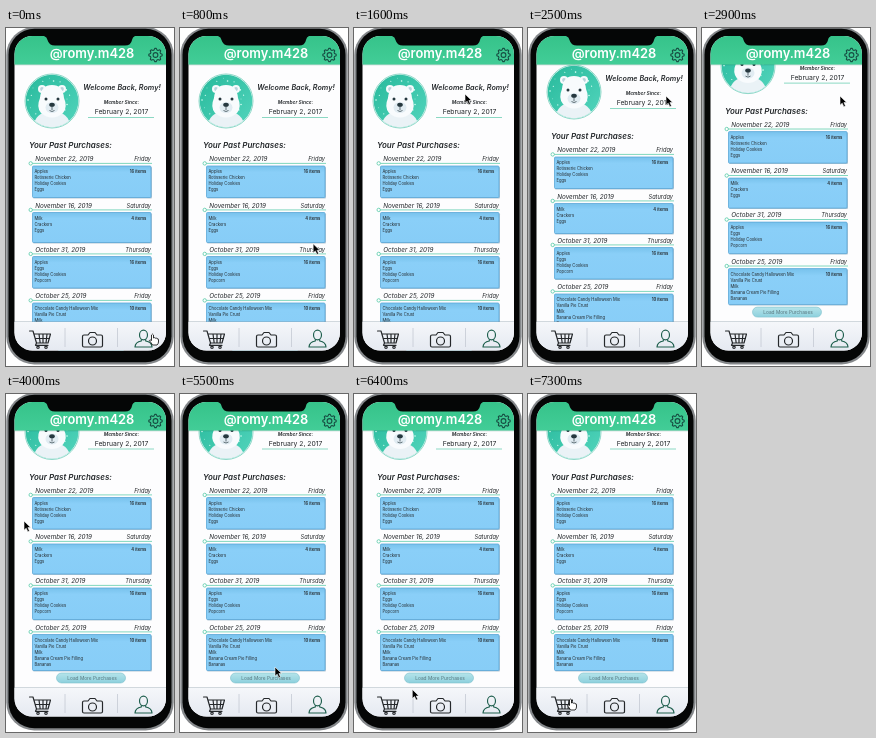
Animation of 168x338 px, one loop 7400 ms. Source, as an HTML page:

```html
<!DOCTYPE html>
<html lang="en">
<head>
<meta charset="utf-8">
<title>Past purchases</title>
<style>
  html, body { margin: 0; width: 100%; height: 100%; overflow: hidden; background: #fff; }
  svg { display: block; width: 100vw; height: 100vh; font-family: Inter, sans-serif; fill: #23272a; }
  .b { font-weight: 600; }
  .i { font-style: italic; }
  .line { fill: none; stroke: #25282b; stroke-width: 1.2; stroke-linecap: round; stroke-linejoin: round; }
</style>
</head>
<body>
<svg viewBox="0 0 168 338">
  <defs>
    <clipPath id="screen"><rect x="8.500" y="8" width="151.500" height="314.500" rx="18"/></clipPath>
    <clipPath id="round"><circle cx="46" cy="69" r="26.300"/></clipPath>
    <linearGradient id="green" x2="0" y2="1"><stop stop-color="#36c38a"/><stop offset="1" stop-color="#42cd97"/></linearGradient>
    <linearGradient id="teal" x2="1" y2="1"><stop stop-color="#27b99b"/><stop offset="1" stop-color="#53d5bd"/></linearGradient>
    <linearGradient id="blue" x2="0" y2="1"><stop stop-color="#78c2ec"/><stop offset=".2" stop-color="#8acff8"/><stop offset="1" stop-color="#87cdf7"/></linearGradient>
    <linearGradient id="pill" x2="0" y2="1"><stop stop-color="#b5e4ea"/><stop offset="1" stop-color="#8dd0dd"/></linearGradient>
    <linearGradient id="bar" x2="0" y2="1"><stop stop-color="#f5f7fa"/><stop offset="1" stop-color="#e5e9f1"/></linearGradient>
  </defs>

  <!-- phone body -->
  <rect x=".3" y="-1" width="167.400" height="337.500" rx="28" fill="#85888b"/>
  <rect x="2.500" y=".8" width="163" height="333.500" rx="26" fill="#050606"/>

  <g clip-path="url(#screen)">
    <rect x="8" y="8" width="153" height="315" fill="#fdfdfe"/>
    <g id="page">
      <g transform="translate(0 4)">
        <circle cx="46" cy="69" r="27" fill="#fff" stroke="#72cdb9" stroke-width=".8"/>
        <g clip-path="url(#round)">
          <rect x="19" y="42" width="54" height="54" fill="url(#teal)"/>
          <g id="snow" fill="#d9fff5"></g>
          <path d="M27 97Q28 80 46 79Q64 80 65 97Z" fill="#eaf2f6"/>
          <circle cx="36" cy="57" r="4" fill="#f6fafc"/><circle cx="56" cy="57" r="4" fill="#f6fafc"/>
          <circle cx="36" cy="57" r="1.900" fill="#bad3dc"/><circle cx="56" cy="57" r="1.900" fill="#bad3dc"/>
          <path d="M34 66Q35 53 46 53Q57 53 58 66Q62 75 57 81Q46 90 35 81Q30 75 34 66Z" fill="#f8fbfd"/>
          <ellipse cx="46" cy="75.500" rx="6.500" ry="5.500" fill="#e1ecf2"/>
          <circle cx="40" cy="67" r="1.500" fill="#26383f"/><circle cx="52" cy="67" r="1.500" fill="#26383f"/>
          <ellipse cx="46" cy="72.800" rx="2.800" ry="2" fill="#26383f"/>
          <path d="M46 74v4M43.500 78.500q2.500 2 5 0" fill="none" stroke="#26383f" stroke-width=".7"/>
        </g>
      </g>
      <g text-anchor="middle">
        <text class="b i" x="116" y="61.500" font-size="7.2">Welcome Back, Romy!</text>
        <text class="b i" x="115.500" y="76" font-size="4.9">Member Since:</text>
        <text x="115.500" y="86.300" font-size="6.8">February 2, 2017</text>
      </g>
      <path d="M82 89.500H148" stroke="#6fd0b4" stroke-width=".8"/>
      <text class="b i" x="23" y="120" font-size="8">Your Past Purchases:</text>
      <g id="cards"></g>
      <rect x="50.500" y="313.500" width="69" height="10" rx="5" fill="url(#pill)" stroke="#7fc0cc" stroke-width=".6"/>
      <text x="86" y="320.200" font-size="4.8" text-anchor="middle" fill="#58777f">Load More Purchases</text>
    </g>

    <!-- header -->
    <rect x="8" y="36" width="153" height="1.300" fill="#17664b" opacity=".25"/>
    <rect x="8" y="8" width="153" height="28.500" fill="url(#green)"/>
    <path d="M38 8H129Q126.500 9 126 12Q125 17.500 119 17.500H49Q43 17.500 41.500 12Q41 9 38 8Z" fill="#050606"/>
    <text class="b" x="86" y="29.700" font-size="12.9" text-anchor="middle" fill="#fff">@romy.m428</text>
    <g id="gear" transform="translate(149.500 27)" fill="none" stroke="#174f43" stroke-width="1.100"></g>

    <!-- tab bar -->
    <rect x="8" y="293" width="153" height="1.400" fill="#7e929e" opacity=".35"/>
    <rect x="8" y="294" width="153" height="29" fill="url(#bar)"/>
    <path d="M59 300V319M111.500 300V319" stroke="#c4cad4" stroke-width=".8"/>
    <g class="line">
      <path d="M23.500 303h3.500l3.500 12h11.500l2.500-9H28M29.500 310.500h14M33 306l1.200 9M37 306v9M41 306l-1 9M30.500 315l-1 2.300h12.500"/>
      <circle cx="32" cy="319.300" r="1.200"/><circle cx="40" cy="319.300" r="1.200"/>
      <path d="M78 307h4l2-2.500h5l2 2.500h4q1.500 0 1.500 1.500v9q0 1.500-1.500 1.500H78q-1.500 0-1.500-1.500v-9q0-1.500 1.500-1.500Z"/>
      <circle cx="86.500" cy="313" r="4"/>
      <g stroke="#20604f">
        <ellipse cx="137.500" cy="307" rx="4" ry="4.800"/>
        <path d="M135.300 311.500v1.500q-6 1-6.300 6h17q-.3-5-6.300-6v-1.500"/>
      </g>
    </g>
  </g>

  <g id="cursor">
    <path id="arrow" d="M0 0V9.200L2.200 7.200L3.800 10.700L5.500 9.900L3.900 6.600H6.700Z" fill="#000" stroke="#fff" stroke-width=".6"/>
    <path id="hand" d="M-1 1Q0-.8 1 1V4Q2 3.200 2.800 4.200Q3.800 3.500 4.500 4.700Q6 4.300 6 6V8Q5.800 10 4.500 11H0Q-1 9-3.200 6.600Q-2.800 5.200-1 6.500Z" fill="#fff" stroke="#000" stroke-width=".8"/>
  </g>
</svg>
<script>
  const $ = id => document.getElementById(id);
  const LOOP = 7400, STEP = 100, SCROLL = 34.5;

  // top of card, height, date, weekday, item count, goods
  const purchases = [
    [138, 31.5, 'November 22, 2019', 'Friday', 16, ['Apples', 'Rotisserie Chicken', 'Holiday Cookies', 'Eggs']],
    [184.5, 30, 'November 16, 2019', 'Saturday', 4, ['Milk', 'Crackers', 'Eggs']],
    [228.5, 31.5, 'October 31, 2019', 'Thursday', 16, ['Apples', 'Eggs', 'Holiday Cookies', 'Popcorn']],
    [275, 36, 'October 25, 2019', 'Friday', 10,
      ['Chocolate Candy Halloween Mix', 'Vanilla Pie Crust', 'Milk', 'Banana Cream Pie Filling', 'Bananas']]
  ];
  $('cards').innerHTML = purchases.map(([y, h, date, day, count, goods]) => `
    <text class="i" x="29.300" y="${y - 4.7}" font-size="6.3">${date}</text>
    <text class="i" x="145" y="${y - 4.7}" font-size="5.7" text-anchor="end">${day}</text>
    <path d="M26 ${y - 2.6}H146" stroke="#62cfae" stroke-width=".8"/>
    <rect x="27" y="${y + 1}" width="119" height="${h}" rx="1" fill="#356b8e" opacity=".38"/>
    <rect x="26.500" y="${y}" width="118.500" height="${h}" rx="1" fill="url(#blue)" stroke="#5ba8d7" stroke-width=".8"/>
    <circle cx="24.700" cy="${y - 2.6}" r="1.700" fill="#fff" stroke="#54c9a6" stroke-width=".8"/>
    <text class="b" x="140.300" y="${y + 7}" font-size="4.2" text-anchor="end">${count} items</text>
    ${goods.map((name, k) => `<text x="28.500" y="${y + 7 + 6 * k}" font-size="4.15">${name}</text>`).join('')}`).join('');

  $('snow').innerHTML = Array.from({ length: 18 }, (_, k) => {
    const a = k * 2.4, r = 15 + k * 7 % 11;
    return `<circle cx="${46 + r * Math.cos(a)}" cy="${67 + r * Math.sin(a)}" r="${.4 + k % 3 * .2}"/>`;
  }).join('');

  const teeth = Array.from({ length: 32 }, (_, k) => {
    const a = (k - .5) * Math.PI / 16, r = k % 4 < 2 ? 6.7 : 5.2;
    return `${r * Math.cos(a)},${r * Math.sin(a)}`;
  });
  $('gear').innerHTML = `<polygon points="${teeth.join(' ')}" stroke-linejoin="round"/><circle r="2.400"/>`;

  // time, x, y of the pointer tip
  const path = [
    [0, 146.5, 306], [300, 146.5, 306], [1500, 111, 66], [1700, 111, 66], [2400, 138, 68],
    [3000, 138, 68], [3900, 18, 127], [4100, 18, 127], [5400, 95, 273],
    [5700, 95, 273], [6800, 42.5, 305], [LOOP, 42.5, 305]
  ];
  const clamp = p => Math.min(1, Math.max(0, p));
  const easeInOut = p => p * p * (3 - 2 * p);
  const easeOut = p => 1 - (1 - p) ** 2;

  function pointerAt(t) {
    const k = path.findIndex(stop => stop[0] > t);
    const [t0, x0, y0] = path[k - 1], [t1, x1, y1] = path[k];
    const p = easeInOut((t - t0) / (t1 - t0));
    return [x0 + (x1 - x0) * p, y0 + (y1 - y0) * p];
  }

  function draw(now) {
    const t = Math.floor(now % LOOP / STEP) * STEP;
    const [x, y] = pointerAt(t);
    const overButton = x > 50 && x < 120 && y > 279 && y < 289;
    const overTab = y > 298;
    const pointing = overButton || overTab;
    $('page').setAttribute('transform', `translate(0 ${-SCROLL * easeOut(clamp((t - 2430) / 500))})`);
    $('cursor').setAttribute('transform', `translate(${x} ${y})`);
    $('hand').style.display = pointing ? '' : 'none';
    $('arrow').style.display = pointing ? 'none' : '';
  }

  const start = performance.now();
  function tick() {
    draw(performance.now() - start);
    requestAnimationFrame(tick);
  }
  tick();
</script>
</body>
</html>
```
